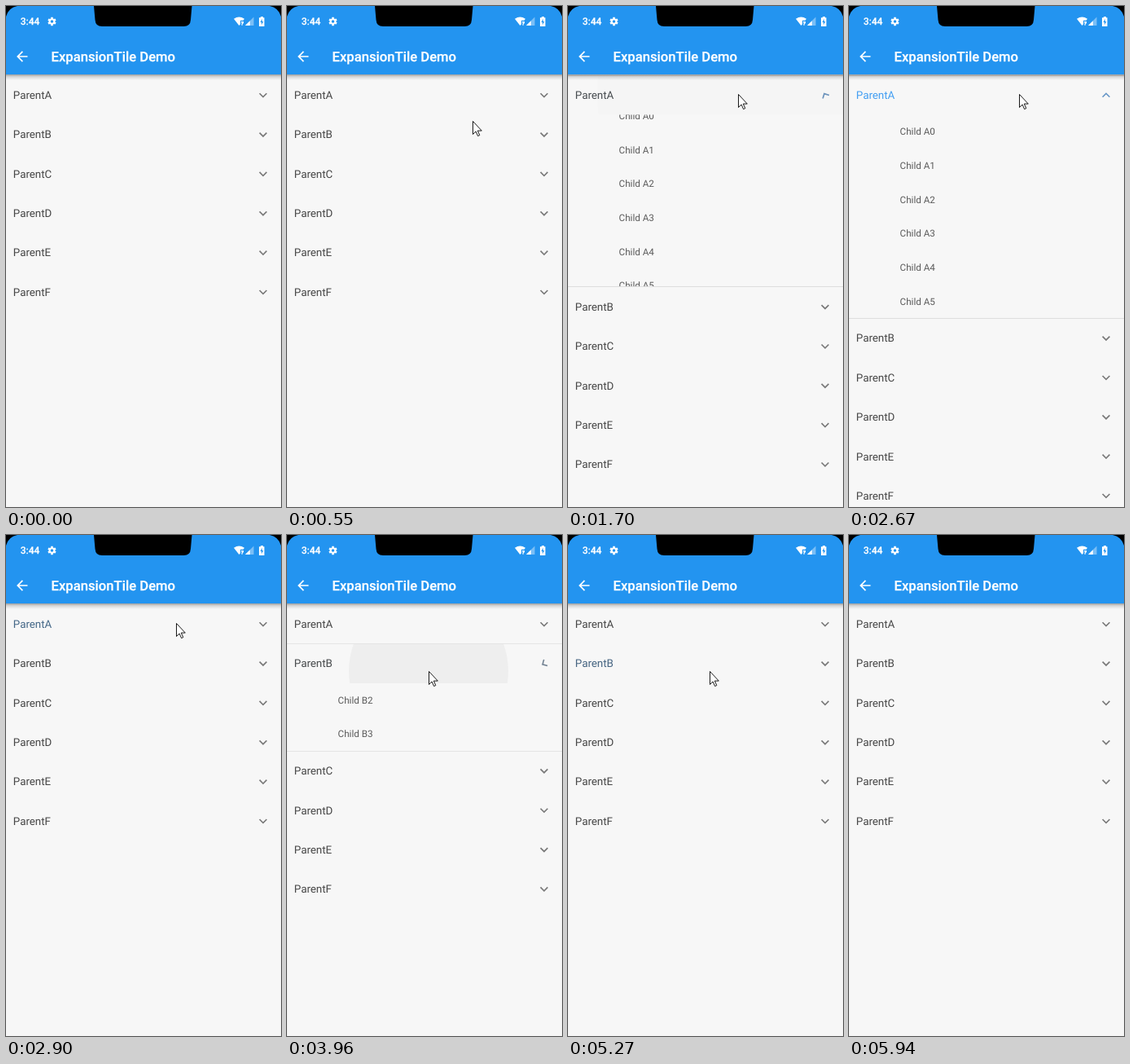
Write an HTML page that moves like this. It is 338 by 615 pixels and loops after 6.58 s.

```html
<!DOCTYPE html>
<html lang="en">
<head>
<meta charset="utf-8">
<title>ExpansionTile Demo</title>
<style>
  html, body { margin: 0; width: 100%; height: 100%; overflow: hidden; background: #f7f7f7; }
  svg { display: block; }
  svg svg { overflow: hidden; }
  text { font-family: Roboto, sans-serif; text-rendering: geometricPrecision; }
  .title, .clock { font-weight: 500; fill: #fff; stroke: #fff; stroke-width: .25px; }
  .title { font-size: 16.67px; }
  .clock { font-size: 12px; }
  .parent { font-size: 13.34px; }
  .child { font-size: 11.67px; fill: #5a5a5a; }
</style>
</head>
<body>
<svg id="stage" width="100%" height="100%" viewBox="0 0 338 615">
  <defs>
    <linearGradient id="shade" x2="0" y2="1">
      <stop offset="0" stop-opacity=".36"/>
      <stop offset=".4" stop-opacity=".13"/>
      <stop offset="1" stop-opacity="0"/>
    </linearGradient>
  </defs>
  <rect width="338" height="615" fill="#f7f7f7"/>
  <g id="list"></g>

  <rect y="84" width="338" height="7" fill="url(#shade)"/>
  <rect width="338" height="84" fill="#2394f0"/>
  <path d="M0 0H14Q3 2 0 13ZM338 0H324Q335 2 338 13Z"/>
  <path d="M108 0L109.500 17Q110 25 118 25H218.500Q226.500 25 227 17L228.500 0Z"/>

  <text class="clock" x="17.800" y="23.300">3:44</text>
  <path fill="#fff" transform="translate(50.300 12.800) scale(.515)" d="M19.430 12.980c.04-.32.07-.64.07-.98s-.03-.66-.07-.98l2.110-1.650c.19-.15.24-.42.12-.64l-2-3.460c-.12-.22-.39-.3-.61-.22l-2.490 1c-.52-.4-1.080-.73-1.690-.98l-.38-2.650C14.460 2.180 14.250 2 14 2h-4c-.25 0-.46.18-.49.42l-.38 2.650c-.61.25-1.170.59-1.690.98l-2.490-1c-.23-.09-.49 0-.61.22l-2 3.460c-.13.22-.07.49.12.64l2.110 1.650c-.04.32-.07.65-.07.98s.03.66.07.98l-2.110 1.650c-.19.15-.24.42-.12.64l2 3.460c.12.22.39.3.61.22l2.490-1c.52.4 1.080.73 1.690.98l.38 2.650c.03.24.24.42.49.42h4c.25 0 .46-.18.49-.42l.38-2.650c.61-.25 1.170-.59 1.690-.98l2.490 1c.23.09.49 0 .61-.22l2-3.460c.12-.22.07-.49-.12-.64l-2.110-1.650zM12 15.500a3.500 3.500 0 1 1 0-7 3.500 3.500 0 0 1 0 7z"/>
  <g fill="#fff">
    <path d="M280 15.800Q286.500 11.200 293 15.800L291.500 17.800H288V22.300L286.500 24Z"/>
    <path d="M289 19h3v2l-1.300 1.200v1.600h-1.200v-2.200l1.200-1.200h-1.700z"/>
    <path d="M304.500 13.500V24H294Z" opacity=".4"/>
    <path d="M299.800 18.200V24H294Z"/>
    <path d="M313 13h3v1.200h1.500v10.800h-6.500V14.200h2z"/>
  </g>
  <path fill="#2394f0" d="M314.800 15.800l-2.300 4.200h1.500v3.200l2.300-4.200h-1.500z"/>
  <path fill="#fff" transform="translate(9.800 52) scale(.8335)" d="M20 11H7.830l5.590-5.590L12 4l-8 8 8 8 1.410-1.410L7.830 13H20z"/>
  <text class="title" x="55.500" y="68">ExpansionTile Demo</text>

  <path id="cursor" d="M.5.5v16l3.600-3.500 2.500 5.600 2.200-1-2.500-5.500h5z" fill="#fff" stroke="#000" stroke-width=".9"/>
  <circle id="press" r="15" fill="#ff0" fill-opacity=".47"/>
</svg>

<script>
const LOOP = 6580, TOP = 85.2, ROW = 48.35, CHILD = 41.67, BODY = 6 * CHILD, ANIM = 200, EASE = 1.63;
const INK = [70, 70, 70], BLUE = [66, 158, 242], GREY = [122, 122, 122], STEEL = [105, 152, 200];

// start, end and interval of each run of screen updates
const RUNS = [[110, 740, 48.8], [780, 960, 45], [1420, 1980, 56], [2670, 3320, 46],
              [3830, 4300, 43], [4990, 5610, 47.5], [5670, 5940, 45]];
const PRESSES = [1190, 2440, 3600, 4760], PRESS_TIME = 230;
const TAPS = [
  { tile: 0, start: 1519.5, open: true, x: 209, y: 108 },
  { tile: 0, start: 2690, open: false, x: 209, y: 108 },
  { tile: 1, start: 3857, open: true, x: 174, y: 167 },
  { tile: 1, start: 5000, open: false, x: 174, y: 167 },
];
const POINTER = [[110, 293, 461], [550, 228, 141], [740, 220, 133], [960, 209, 108], [3000, 209, 108],
                 [3320, 174, 167], [5240, 174, 167], [5610, 288, 549], [5940, 304, 618]];

const clamp = v => Math.min(1, Math.max(0, v));
const lerp = (a, b, p) => a + (b - a) * p;
const mix = (a, b, p) => `rgb(${a.map((v, i) => Math.round(lerp(v, b[i], p)))})`;
const byId = id => document.getElementById(id);

function set(node, attrs) {
  for (const key in attrs) node.setAttribute(key, attrs[key]);
  return node;
}

function add(parent, tag, attrs, text = '') {
  const node = set(document.createElementNS('http://www.w3.org/2000/svg', tag), attrs);
  node.textContent = text;
  return parent.appendChild(node);
}

const tiles = [...'ABCDEF'].map((letter, index) => {
  const root = add(byId('list'), 'g', {});
  const header = add(root, 'svg', { width: 338, height: ROW });
  const ripple = add(header, 'circle', { fill: '#c8c8c8' });
  const label = add(header, 'text', { class: 'parent', x: 8.8, y: 28.9 }, 'Parent' + letter);
  const chevron = add(header, 'path', { d: 'M4.590-3.410L0 1.170-4.590-3.410-6-2 0 4 6-2z' });
  const tile = { root, ripple, label, chevron };
  if (index < 2) {
    tile.body = add(root, 'svg', { y: ROW, width: 338 });
    tile.children = add(tile.body, 'g', {});
    for (let i = 0; i < 6; i++)
      add(tile.children, 'text', { class: 'child', x: 62.6, y: CHILD * (i + .5) + 3.8 }, `Child ${letter}${i}`);
    tile.lines = [0, 1].map(() => add(root, 'rect',
      { width: 338, height: 1, fill: '#dedede', 'shape-rendering': 'crispEdges' }));
  }
  return tile;
});

function tileState(index, t) {
  const tap = TAPS.filter(e => e.tile === index && e.start <= t).pop();
  if (!tap) return { size: 0, line: 0, tint: 0, fade: 0, age: 0, tap: TAPS[0] };
  const age = t - tap.start, p = clamp(age / ANIM), late = clamp(age / ANIM - 1);
  const grown = tap.open ? p : 1 - p;
  return {
    tap, age,
    size: grown ** EASE,
    line: 1 - (1 - grown) ** EASE,
    tint: tap.open ? .06 * p + .94 * late : 1 - .6 * p - .4 * late, // label colour trails the expansion
    fade: .4 * (1 - p),
  };
}

function drawTiles(t) {
  let y = TOP;
  tiles.forEach((tile, index) => {
    const { size, line, tint, fade, age, tap } = tileState(index, t);
    const height = BODY * size;
    set(tile.root, { transform: `translate(0 ${y})` });
    set(tile.label, { fill: mix(INK, BLUE, tint) });
    set(tile.chevron, {
      fill: mix(GREY, STEEL, size),
      transform: `translate(316 24.300) rotate(${180 * size}) scale(.8335)`,
    });
    set(tile.ripple, { cx: tap.x, cy: tap.y - y, r: .96 * Math.min(age, ANIM), opacity: fade });
    if (tile.body) {
      set(tile.body, { height, visibility: height ? 'visible' : 'hidden' });
      set(tile.children, { transform: `translate(0 ${(height - BODY) / 2})` });
      set(tile.lines[0], { y: -.2, opacity: line });
      set(tile.lines[1], { y: ROW + height - .6, opacity: line });
    }
    y += ROW + height;
  });
}

function pointerAt(t) {
  const i = POINTER.findIndex(k => k[0] > t);
  if (i < 1) return null;
  const [t0, x0, y0] = POINTER[i - 1], [t1, x1, y1] = POINTER[i];
  const p = (1 - Math.cos(Math.PI * (t - t0) / (t1 - t0))) / 2;
  return [Math.round(lerp(x0, x1, p)), Math.round(lerp(y0, y1, p))];
}

function drawPointer(t) {
  const at = pointerAt(t);
  const pressed = PRESSES.some(s => t >= s && t < s + PRESS_TIME);
  set(byId('cursor'), { visibility: at ? 'visible' : 'hidden' });
  set(byId('press'), { visibility: pressed ? 'visible' : 'hidden' });
  if (!at) return;
  for (const id of ['cursor', 'press']) set(byId(id), { transform: `translate(${at})` });
}

function snap(t) {
  const run = RUNS.find(([start, end]) => t >= start && t < end);
  return run ? run[0] + Math.floor((t - run[0]) / run[2]) * run[2] : t;
}

const begin = performance.now();
function frame() {
  const t = snap((performance.now() - begin) % LOOP);
  drawTiles(t);
  drawPointer(t);
  requestAnimationFrame(frame);
}
frame();
</script>
</body>
</html>
```
